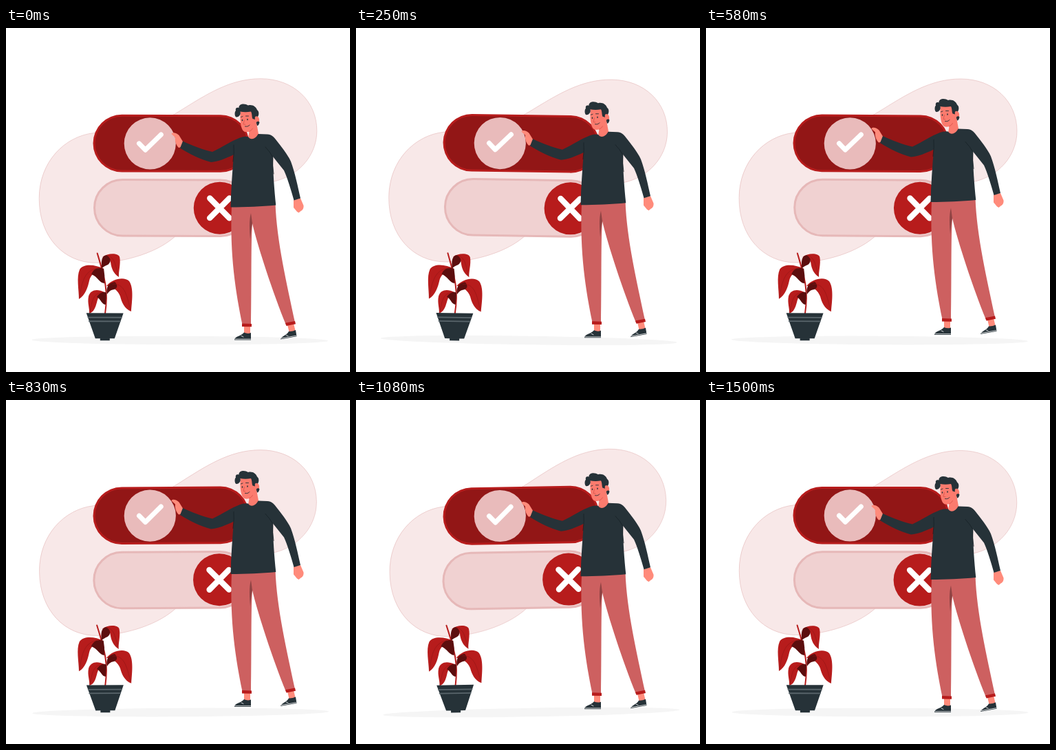
Animation, 500 px wide and 500 px high, one loop 1.54 s. Source, as an HTML page:

```html
<!DOCTYPE html>
<html lang="en">
<head>
<meta charset="utf-8">
<title>Toggle switches</title>
<style>
  html, body { margin: 0; width: 100%; height: 100%; overflow: hidden; background: #fff; }
  svg { display: block; width: 100%; height: 100%; }
  .red { fill: #b71c1c; }
  .deep { fill: #5c0e0e; }
  .dark { fill: #263238; }
  .skin { fill: #ff8b7b; }
  .face { fill: #fb7b6e; }
  .pants { fill: #cd6060; }
  .line { fill: none; stroke-linecap: round; stroke-linejoin: round; }
</style>
</head>
<body>
<svg viewBox="0 0 500 500">
  <g data-pivot="250 207.5">
    <path fill="#f8e8e8" stroke="#dfadad" stroke-width=".5" d="M48.3 248C48.300 195 85 158 127 153C165 149 205 150 250 122C290 97 325 73.300 370 73.300C417 73.300 451.700 105 451.700 149C451.700 185 425 215 388 223C330 236 285 265 245 304C215 330 165 341.700 131 341.700C85 341.700 48.300 305 48.300 248Z"/>
  </g>

  <g data-pivot="253 340">
    <ellipse cx="253" cy="454" rx="215.5" ry="6.3" fill="#f5f5f5"/>
    <rect x="128.3" y="220.8" width="224" height="81.5" rx="40.7" fill="#f0d1d1" stroke="#e6b8b8" stroke-width="3"/>
    <circle class="red" cx="310.5" cy="261.5" r="38"/>
    <path class="line" stroke="#fff" stroke-width="8.4" d="M296 247.3L324.5 276M324.5 247.3L296 276"/>
  </g>

  <g data-pivot="240 168">
    <rect class="red" x="126.5" y="126" width="227" height="83.6" rx="41.8"/>
    <rect x="129.5" y="129" width="221" height="77.6" rx="38.8" fill="#921616"/>
    <circle cx="209.3" cy="168" r="37.6" fill="#e9bbbb"/>
    <path class="line" stroke="#fff" stroke-width="7" d="M193.5 168L202.5 177.3L225.3 155"/>
  </g>

  <g data-pivot="144.5 390.5">
    <path class="line" stroke="#b71c1c" stroke-width="2" d="M132.5 327.5C136 339 142 358 144.5 374C147 389 146 402 144 416"/>
    <g class="red">
      <path d="M140 333C148 326 164 327 165 333C167 343 163 355 164 362C156 357 153 349 152 341C151 334 147 331 140 333Z"/>
      <path d="M142 350C130 344 113 342 107 351C102 362 106 380 106 394C115 389 119 377 121 367C123 358 132 351 142 350Z"/>
      <path d="M146 375C155 364 172 361 179 368C186 378 183 398 182 412C172 408 168 398 166 390C163 382 155 375 146 375Z"/>
      <path d="M143 384C133 379 123 380 120 390C118 400 122 408 121 415C128 413 130 406 132 399C134 390 138 386 143 384Z"/>
    </g>
    <g class="deep">
      <path d="M139 350C138 338 139 331 146 330C154 335 152 341 148 344C144 346 141 347 139 350Z"/>
      <path d="M143 371C136 371 133 361 124 358C127 350 134 347 142 350Q144 360 143 371Z"/>
      <path d="M147 387C145 378 148 371 158 369C163 374 162 378 157 380C151 381 149 384 147 387Z"/>
      <path d="M145 402C139 402 138 394 132 391C136 385 142 382 146 385Z"/>
    </g>
    <path class="line" stroke="#921616" stroke-width=".6" d="M148 331C158 333 159 345 163 359M139 349C115 348 110 368 107 391M155 372C174 371 176 392 181 409M140 384C125 386 125 400 122 413"/>
    <path class="dark" d="M116.8 414.3H170.7L158 451.3H151V454.3H137V451.3H130Z"/>
    <path class="line" stroke="#59656b" stroke-width="1.8" d="M119.5 420.7H168M121 426.3H166"/>
  </g>

  <g id="man">
    <g class="skin">
      <path d="M346 432H355V446H346Z"/>
      <path d="M409 431L418 429L421 442L412 444Z"/>
      <path d="M257 165L251.5 156C248 152 241 151 240.5 154L246 159C245 165 248 171 251 174L257 172.5Z"/>
      <path d="M418 250L428 247.5L432.500 258C433 262 431 265 428.500 266L425.500 268.500L423 267L418 261Z"/>
    </g>
    <path class="dark" d="M332 453.5C332 448 342 448 346 442.5Q351 445 356 443V453.5ZM399 452.500C400 448 408 447 411 441Q416 441.500 421 439L422.500 448.300Z"/>
    <path class="line" stroke="#fff" stroke-width=".8" d="M333 452.2H355.5M400 451.100L421.700 447.200M342 447.5L345 449M407 446.500L410 447.500"/>

    <path class="pants" d="M328 258L391.500 255C393.500 310 408 371 420 428L407 431.5C388 385 366 318 358 284C356 310 357 370 356 431H343.5C334 385 325 330 328 258Z"/>
    <path fill="#8f4343" d="M356 269C353 280 354 294 355 307C356 295 357 289 358 284Z"/>
    <path class="red" d="M343 429.5L357 430V434.2L343 434ZM406 428.8L420 426L421 430.2L407.5 433Z"/>

    <path class="face" d="M341 119C339.5 133 341 143 344 148.5C346.5 152 351 151.5 353.5 150.5L352 160C357 165 364 161 367 154L364.5 140C370 139 369 128 364 128L358 118Z"/>
    <path class="dark" d="M334.5 129.5C332 128 332 122 334 120C333 116 336 115 338.5 116C338 110 347 109 352 112.5C358 111 363 114 365 119C368 121 368 126 366 129C363 127 361 129 362 133L358.5 132C357 129 358 125 356 121.500C351 122.500 345 122.500 340.5 121.500C342 126 338 130 334.5 129.5ZM364 138.5C363 136 367 134.5 368.5 137C368 140 366.5 142 365 142Z"/>
    <path class="line" stroke="#263238" stroke-width=".9" d="M341.5 129.500L344 128.500M348.5 128L352.5 128M347.5 143Q352 144 354 141"/>
    <ellipse class="dark" cx="343.5" cy="134" rx=".8" ry="1.2"/>
    <ellipse class="dark" cx="351" cy="133" rx=".8" ry="1.2"/>
    <path class="line" stroke="#d9534b" stroke-width=".8" d="M346.5 134L345 140L348 140.3M353.5 150.5Q357 149 358.5 146"/>

    <path class="dark" d="M352 158C356 164 363 161 366.5 154L380 154.5C386 155 389 158 392 162C399 171 409 183 414 194C420 210 424 230 428 247.5L418.5 250.5C414 234 409 218 404 207L388 187C388 210 390 235 392.300 257.500C372 259.500 348 260.500 326.5 260.500C327 235 329 210 331 184C319 190 308 194 298 195C282 191 267 183 253 174.5L257 164.5C271 171 286 177 300 180C315 173 328 164 340 159.500Q346 157 352 158Z"/>
    <path class="line" stroke="#172126" stroke-width=".8" d="M377 173Q384 180 388 188Q386.500 200 389 212M331 170Q332 180 330 194"/>
  </g>
</svg>
<script>
  const LOOP = 1540, START = 65;
  const man = document.getElementById('man');
  const swaying = document.querySelectorAll('[data-pivot]');

  function draw(now) {
    const p = ((now + START) / LOOP) % 1;
    const lift = 10 * (1 - Math.abs(2 * p - 1));
    const angle = p < .25 ? 4 * p : p < .75 ? 2 - 4 * p : 4 * p - 4;
    man.setAttribute('transform', `translate(0 ${0.85 - lift})`);
    for (const part of swaying) {
      part.setAttribute('transform', `rotate(${angle} ${part.dataset.pivot})`);
    }
  }

  const begin = performance.now();
  function tick() {
    draw(performance.now() - begin);
    requestAnimationFrame(tick);
  }
  tick();
</script>
</body>
</html>
```
